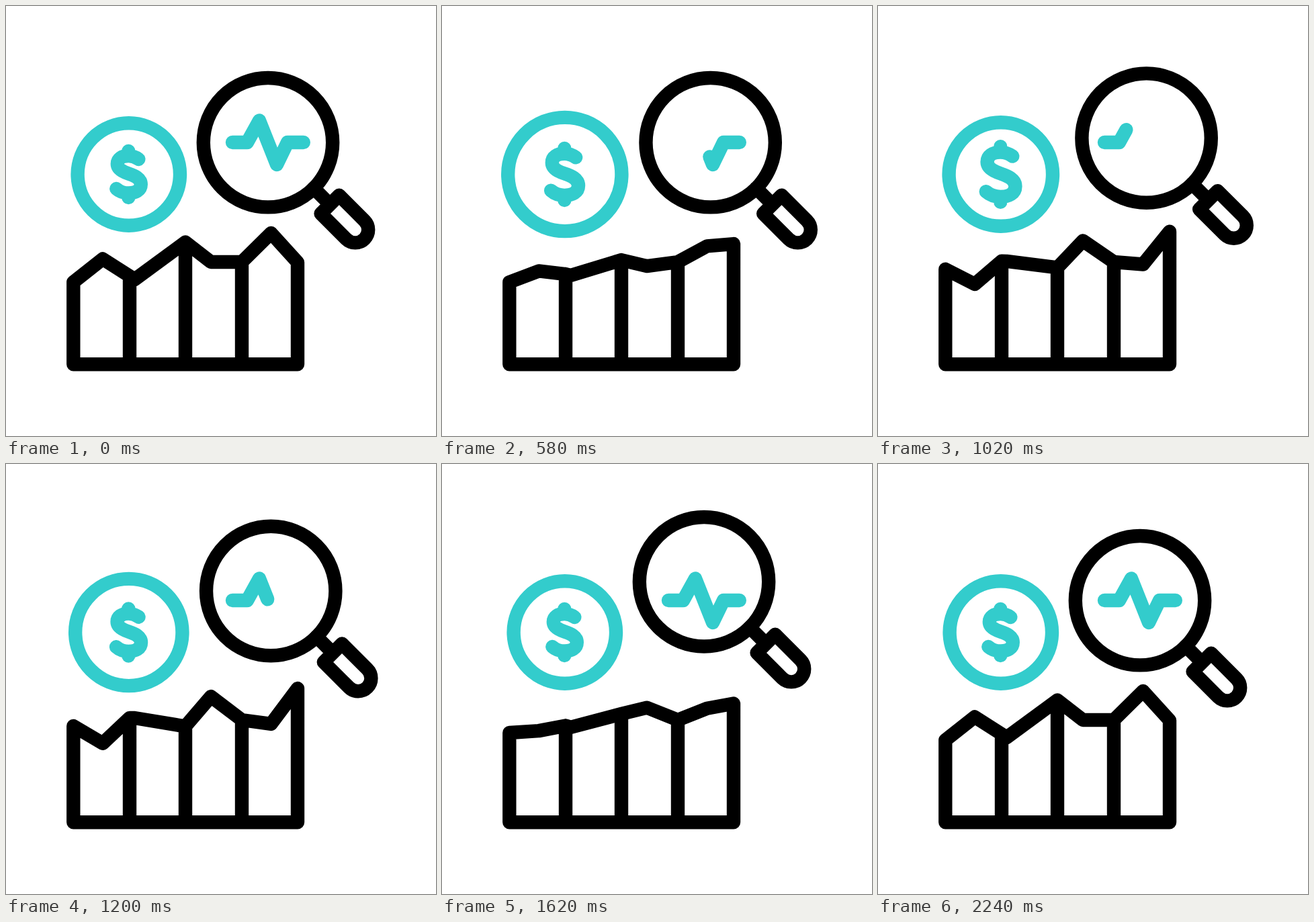
Write an HTML page that moves like this. It is 640 px wide and 640 px high and loops after 2480 ms.

```html
<!DOCTYPE html>
<html lang="en">
<head>
<meta charset="utf-8">
<title>Market analysis</title>
<style>
  html, body { margin: 0; width: 100%; height: 100%; overflow: hidden; background: #fff; }
  svg { display: block; width: 100vw; height: 100vh; }
  g { fill: none; stroke-width: 20.4; stroke-linecap: round; stroke-linejoin: round; }
  .ink { stroke: #000; }
  .accent { stroke: #33cccc; }
</style>
</head>
<body>
<svg viewBox="0 0 640 640">
  <g class="accent">
    <circle id="coin" cx="182.8" cy="250.5"/>
    <path id="dollar" d="M15 -22.5C10 -26 5 -27.5 0 -27.5C-10 -27.5 -16.5 -23 -16.5 -15.5
      S-9 -4 0 -1S18.5 6 18.5 15S10 28 0 28C-7 28 -13 26 -18 21.5M0 -34.5V-28M0 28V34.5"/>
    <path id="pulse" pathLength="1" d="M337 203H359L377 170.5L403 236L419 203H442.8"/>
  </g>
  <g class="ink">
    <path id="chart"/>
    <g id="glass">
      <circle r="96.2"/>
      <path transform="rotate(45)" d="M96 0H130.4M130.4 -19.3H183.7A19.3 19.3 0 0 1 183.7 19.3H130.4Z"/>
    </g>
  </g>
</svg>
<script>
const LOOP = 2480, STEP = 20, LINE = 20.4, BASE = 533.3;
const byId = id => document.getElementById(id);
const [coin, dollar, pulse, chart, glass] = ['coin', 'dollar', 'pulse', 'chart', 'glass'].map(byId);

const mix = (a, b, p) => a + (b - a) * p;
const ramp = (t, from, to) => Math.min(1, Math.max(0, (t - from) / (to - from)));
const smooth = p => p * p * (3 - 2 * p);
const ease = (t, from, to) => smooth(ramp(t, from, to));

// Ridge points: x, then height at rest, half way and at the turn.
const RIDGE = [
  [100.3, 411, 412, 390], [144, 376.5, 393.5, 415.8], [184, 402, 400, 378],
  [191.5, 407, 402, 378], [267, 351.5, 377.5, 390.5], [305, 381, 389, 346],
  [351, 381, 381, 381], [394.5, 338, 356, 387], [434, 381.5, 355, 334]
];

function drawChart(t) {
  const half = ease(t, 160, 500), turn = ease(t, 500, 1130), back = ease(t, 1180, 2090);
  const points = RIDGE.map(([x, rest, mid, end]) =>
    [x, mix(mix(mix(rest, mid, half), end, turn), rest, back)]);
  const posts = [points[2], points[4], points[6]].map(p => `M${p}V${BASE}`);
  chart.setAttribute('d', `M100.3 ${BASE}L${points.join('L')}V${BASE}Z${posts.join('')}`);
}

// The coin swells, then settles with one small rebound.
function drawCoin(t) {
  const swell = ease(t, 470, 690) - ease(t, 690, 930);
  const rebound = ease(t, 930, 1180) - ease(t, 1180, 1440);
  coin.setAttribute('r', 76.2 + 16.8 * swell + 3.5 * rebound);

  const scale = 1 + 0.33 * (ease(t, 400, 840) - ease(t, 840, 1250));
  dollar.setAttribute('transform', `translate(182.3 250.5) scale(${scale})`);
  dollar.setAttribute('stroke-width', LINE / scale);
}

// Right, then up along a curve, then straight back down.
function drawGlass(t) {
  const out = ease(t, 330, 770);
  const rise = Math.sin(ramp(t, 780, 1770) * Math.PI / 2) ** 1.5;
  const fall = ease(t, 1770, 2240);
  const x = 390 + 16 * out * (1 - rise) ** 2;
  const y = 203.2 - 29.2 * (rise - fall);
  glass.setAttribute('transform', `translate(${x} ${y})`);
  if (t < 780) return;
}

// The beat is wiped out from the left, then drawn again from the left.
function drawPulse(t) {
  const redraw = t > 855;
  const from = redraw ? 0 : ramp(t, 150, 848);
  const to = redraw ? ramp(t, 860, 1560) : 1;
  pulse.setAttribute('visibility', to > from ? 'visible' : 'hidden');
  pulse.setAttribute('stroke-dasharray', `${to - from} 2`);
  pulse.setAttribute('stroke-dashoffset', -from);
}

const begin = performance.now();
function tick() {
  const t = Math.floor((performance.now() - begin) % LOOP / STEP) * STEP;
  for (const draw of [drawChart, drawCoin, drawGlass, drawPulse]) draw(t);
  requestAnimationFrame(tick);
}
tick();
</script>
</body>
</html>
```
